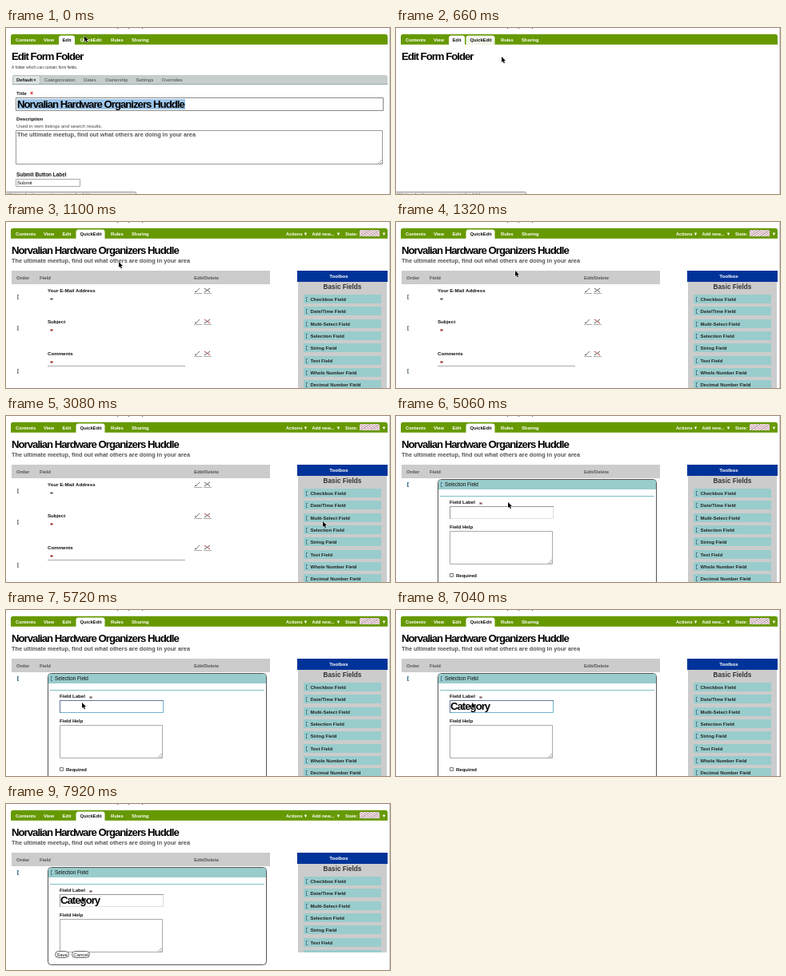
These frames come from a looping animation (480x208 px, 8000 ms). An HTML page with a canvas:

```html
<!DOCTYPE html>
<html lang="en">
<head>
<meta charset="utf-8">
<title>Form editor demo</title>
<style>
html, body { margin: 0; width: 100%; height: 100%; overflow: hidden; background: #fff; }
canvas { display: block; width: 480px; height: 208px; }
</style>
</head>
<body>
<canvas id="stage" width="480" height="208"></canvas>
<script>
const ctx = document.getElementById('stage').getContext('2d');
const LOOP = 8000;
const TITLE = 'Norvalian Hardware Organizers Huddle';
const SUBTITLE = 'The ultimate meetup, find out what others are doing in your area';
const GREEN = '#669900', TEAL = '#99cccc', GREY = '#cccccc', INK = '#111';
const FIELDS = ['Checkbox Field', 'Date/Time Field', 'Multi-Select Field', 'Selection Field',
  'String Field', 'Text Field', 'Whole Number Field', 'Decimal Number Field'];

const POINTER = [
  [0, 98, 10], [220, 102, 13], [440, 118, 25], [660, 132, 36], [1100, 141, 50],
  [1320, 149, 61], [1760, 156, 88], [1980, 163, 115], [2420, 255, 108], [2640, 346, 97],
  [3080, 396, 132], [3300, 397, 137], [3740, 352, 130], [3960, 258, 114], [4400, 158, 97],
  [4620, 150, 94], [5060, 140, 108], [5280, 128, 116], [5720, 95, 116]
];
const TYPING = [[6380, 'Ca'], [6600, 'Catego'], [7040, 'Category']];

const latest = (keys, t) => keys.filter(k => k[0] <= t).pop();

function text(str, x, y, { size = 6, color = INK, style = 'bold', align = 'left', spacing = 0 } = {}) {
  ctx.font = `${style} ${size}px "Liberation Sans", Arial, sans-serif`;
  ctx.letterSpacing = spacing + 'px';
  ctx.textAlign = align;
  ctx.fillStyle = color;
  ctx.fillText(str, x, y);
}
const heading = (str, x, y) => text(str, x, y, { size: 13.2, spacing: -1, color: '#000' });

function rect(x, y, w, h, color) {
  ctx.fillStyle = color;
  ctx.fillRect(x, y, w, h);
}
function roundTop(x, y, w, h, color) {
  ctx.beginPath();
  ctx.roundRect(x, y, w, h, [3, 3, 0, 0]);
  ctx.fillStyle = color;
  ctx.fill();
}
function frame(x, y, w, h, color, radius = 0, fill = '#fff') {
  ctx.beginPath();
  ctx.roundRect(x + .5, y + .5, w - 1, h - 1, radius);
  ctx.fillStyle = fill;
  ctx.fill();
  ctx.strokeStyle = color;
  ctx.lineWidth = 1;
  ctx.stroke();
}
function line(color, ...pts) {
  ctx.beginPath();
  for (let i = 0; i < pts.length; i += 2) ctx.lineTo(pts[i], pts[i + 1]);
  ctx.strokeStyle = color;
  ctx.lineWidth = 1;
  ctx.stroke();
}
function grip(x, y, color = '#4a7a90') {
  rect(x, y, 2, 6, color);
  rect(x + 1, y + 1, 1, 4, '#b8d4dc');
}
function resizer(x, y) {
  line('#aaa', x - 5, y, x, y - 5);
  line('#aaa', x - 2, y, x, y - 2);
}

function tabBar(t) {
  const onPage = t >= 1100, hover = t >= 220;
  roundTop(6, 7.7, 471, 13, GREEN);
  if (!onPage) roundTop(66, 9.5, 20, 11.5, '#fff');
  if (hover) roundTop(87.5, 9.5, 36, 11.5, onPage ? '#fff' : '#f1f5ea');
  const label = (str, x, dark) => text(str, x, 17.3, { size: 5.8, color: dark ? INK : '#fff' });
  label('Contents', 12, false);
  label('View', 47, false);
  label('Edit', 70.5, !onPage);
  label('QuickEdit', 92.5, hover);
  label('Rules', 131, false);
  label('Sharing', 157, false);
  if (!onPage) return;
  const menu = (str, x, arrowX) => {
    text(str, x, 16.5, { size: 5.6, color: '#fff' });
    text('▼', arrowX, 16.5, { size: 6, color: '#fff' });
  };
  menu('Actions', 350, 371.5);
  menu('Add new...', 382.5, 412.5);
  menu('State:', 424, 469.5);
  rect(442, 10, 25, 8, '#eddde2');
  for (let i = 0; i < 50; i++) {
    rect(442 + i / 2, 10 + (i * 5) % 8, 1, 1, i % 3 ? '#c08a9c' : '#777');
  }
}

function statusBar() {
  frame(-1, 205, 164, 6, '#999', 1, '#e4e4e4');
  text('Waiting for the page to open in the folder', 2, 210.5, { style: 'normal', color: '#333' });
}

function editForm() {
  text('A folder which can contain form fields.', 7, 51, { size: 4.9, style: 'normal', color: '#333' });
  roundTop(8, 59, 469, 11.5, '#c6cdcd');
  frame(8, 59, 35, 12, '#b4bcbc', 2, '#dde2e2');
  line('#9aa', 8, 70.5, 477, 70.5);
  text('Default', 13, 67.3);
  text('×', 34, 67.3);
  [['Categorization', 48], ['Dates', 97], ['Ownership', 124], ['Settings', 162.5], ['Overrides', 194.5]]
    .forEach(([str, x]) => text(str, x, 67.3, { style: 'normal', color: '#444' }));

  text('Title', 13, 84, { size: 6.2 });
  text('×', 30, 84, { size: 7, color: '#c00' });
  frame(12, 87, 460, 17, '#888');
  rect(14, 89, 210, 13, '#9fc6ea');
  heading(TITLE, 14, 100.3);

  text('Description', 13, 116, { size: 6.1 });
  text('Used in item listings and search results.', 13, 125, { size: 6.1, style: 'normal', color: '#444' });
  frame(12, 128, 459, 43, '#999');
  text(SUBTITLE, 14, 135.5, { size: 7.3, color: '#555' });
  resizer(470, 170);

  text('Submit Button Label', 13, 186, { size: 6.4 });
  frame(12, 189, 81, 10, '#aaa');
  text('Submit', 14, 196.3, { style: 'normal' });
}

function toolbox(bottom) {
  ctx.save();
  ctx.beginPath();
  ctx.rect(364, 61, 113, bottom - 61);
  ctx.clip();
  rect(365, 61, 111, 147, GREY);
  rect(364, 61, 113, 14, '#003399');
  text('Toolbox', 416, 70.4, { size: 6.2, color: '#fff', align: 'center' });
  text('Basic Fields', 420.5, 84.3, { size: 8.2, color: '#333', align: 'center' });
  FIELDS.forEach((name, i) => {
    const y = Math.round(91 + i * 15.3);
    rect(372, y, 97, 11, TEAL);
    grip(375, y + 3);
    text(name, 380.5, y + 8, { color: '#222' });
  });
  ctx.restore();
}

function tableHead() {
  text(SUBTITLE, 7, 51, { size: 7.3, color: '#555' });
  rect(7, 61, 323, 17, GREY);
  [['Order', 13], ['Field', 42], ['Edit/Delete', 235]]
    .forEach(([str, x]) => text(str, x, 72, { color: '#555' }));
}

function tableRows(shifted) {
  const dy = shifted ? 21 : 0;
  ['Your E-Mail Address', 'Subject', 'Comments'].forEach((name, i) => {
    const y = Math.round(88 + i * 39.3) + dy;
    const red = shifted === (i === 0);
    text(name, 52, y, { size: 6.15 });
    frame(55, y + 7, 4, 3, red ? '#c99' : '#aaa');
    rect(56, y + 8, 2, 1, red ? '#a00' : '#555');
    grip(14, y + (i === 2 ? 17 : 3), '#888');
    line('#777', 237, y, 242, y - 5);
    rect(236, y - 1, 2, 1, '#444');
    line('#aaa', 235, y + 1.5, 245, y + 1.5);
    line(red ? '#b33' : '#555', 248, y - 5, 255, y);
    line('#555', 248, y, 255, y - 5);
    line('#aaa', 247, y + 1.5, 257, y + 1.5);
  });
  line('#aaa', 52, 180.5 + dy, 224, 180.5 + dy);
}

function dragging(x, y) {
  rect(x - 41, y - 8, 97, 13, TEAL);
  grip(x - 38, y - 4);
  text('Selection Field', x - 33, y, { style: 'italic bold', color: '#222' });
}

function fieldPanel(t) {
  const collapsed = t >= 7700, focused = t >= 5720 && t < 7260;
  grip(14, 83);
  frame(52, 79, 274, collapsed ? 123 : 140, '#555', 4);
  roundTop(53, 80, 272, 12, TEAL);
  grip(56, 83);
  text('Selection Field', 61, 88, { size: 6.4, style: 'normal' });
  line('#7cc0c8', 55, 100.5, 323, 100.5);

  text('Field Label', 67, 110.3, { size: 6.1 });
  frame(104, 108, 4, 3, '#aaa');
  rect(105, 109, 2, 1, '#a44');
  frame(67, 113, 130, 16, focused ? '#6fb4cc' : '#ddd');
  line(focused ? '#679' : '#999', 67.5, 129, 67.5, 113.5, 197, 113.5);
  const typed = latest(TYPING, t);
  if (typed) heading(typed[1], 68, 125.3);

  text('Field Help', 67, 141.3, { size: 6.1 });
  frame(67, 144, 129, 42, '#aaa');
  resizer(195, 185);
  if (collapsed) {
    [['Save', 61, 18], ['Cancel', 82, 23]].forEach(([str, x, w]) => {
      frame(x, 184, w, 9, '#666', 4);
      text(str, x + w / 2, 190.7, { style: 'normal', align: 'center' });
    });
  } else {
    frame(67, 197, 5, 5, '#777');
    text('Required', 75, 202);
  }
}

function pointer(x, y) {
  ctx.beginPath();
  [[0, 0], [0, 7], [1.6, 5.6], [2.8, 8.2], [4, 7.6], [2.9, 5.1], [5, 5]]
    .forEach(([dx, dy]) => ctx.lineTo(x + dx, y + dy));
  ctx.closePath();
  ctx.strokeStyle = '#fff';
  ctx.lineWidth = 1;
  ctx.stroke();
  ctx.fillStyle = '#000';
  ctx.fill();
}

function draw(t) {
  const [, x, y] = latest(POINTER, t);
  rect(0, 0, 480, 208, '#fff');
  rect(479, 0, 1, 208, '#ccc');
  [139, 153, 170].forEach(px => rect(px, 0, 1, 1, '#666'));
  tabBar(t);
  if (t < 1100) {
    heading('Edit Form Folder', 7, 40.3);
    if (t < 440) editForm();
    statusBar();
  } else {
    const shifted = t >= 3960;
    heading(TITLE, 7, 40.3);
    tableHead();
    toolbox(t >= 7700 ? 186 : 208);
    if (t >= 5060) fieldPanel(t);
    else {
      tableRows(shifted);
      if (shifted) {
        ctx.setLineDash([1.5, 1]);
        frame(7, 78, 141, 15, '#888');
        ctx.setLineDash([]);
      }
      if (t >= 3740) dragging(x, y);
    }
  }
  pointer(x, y);
}

function tick() {
  draw(performance.now() % LOOP);
  requestAnimationFrame(tick);
}
tick();
</script>
</body>
</html>
```
